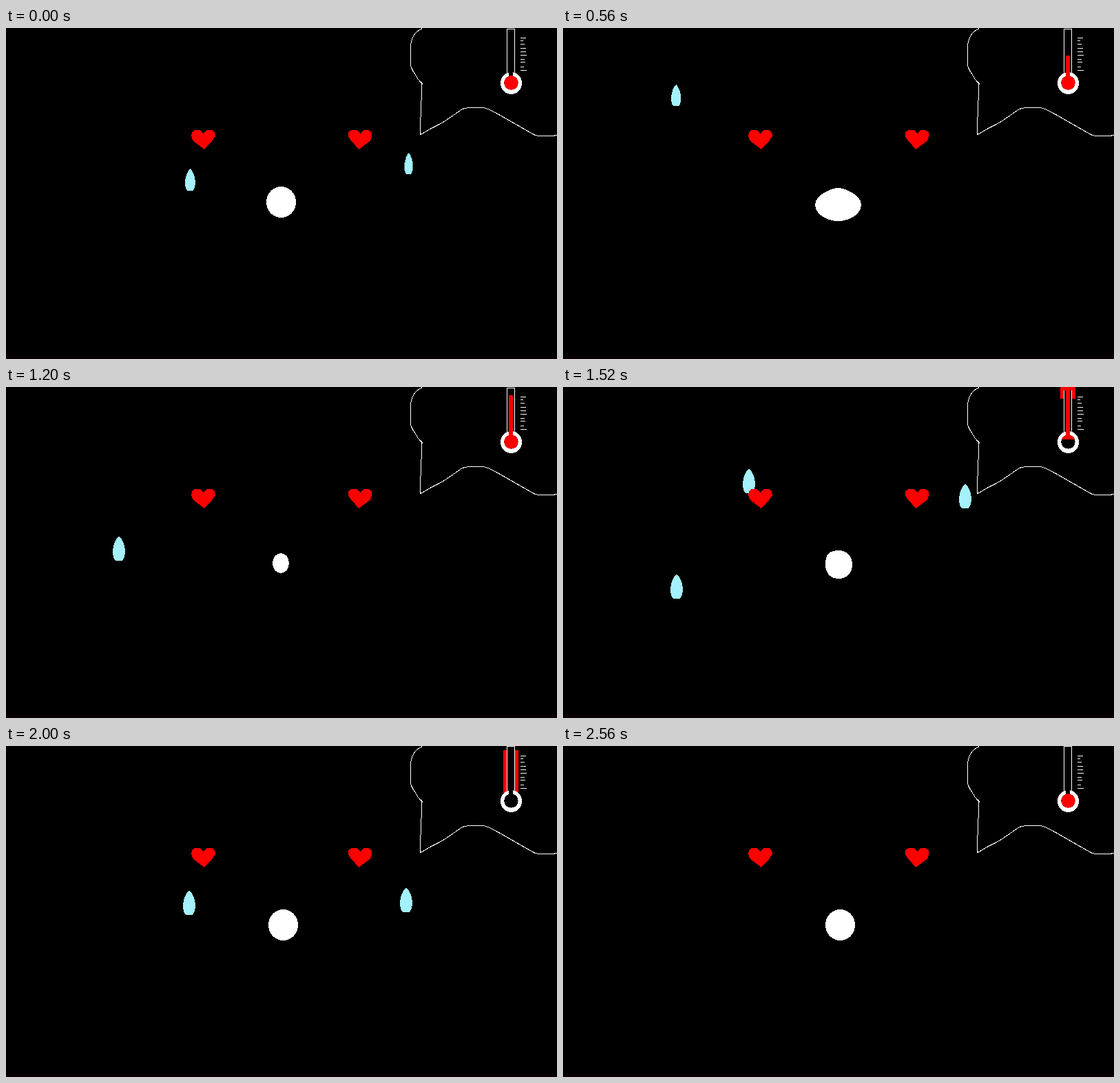
Recreate the animation shown at these times as an HTML page without scripts. Size 800x480 px, loop 2.64 s.

```html
<!DOCTYPE html>
<html lang="en">
<head>
<meta charset="utf-8">
<title>Warm face</title>
<style>
  html, body { margin: 0; width: 100%; height: 100%; overflow: hidden; background: #000; }
  svg { display: block; width: 800px; height: 480px; }

  /* One tick is 80 ms, 3.03% of the loop; steps() counts ticks. */
  .mouth, .drop, .column, .bulb, .side, .cap, .tube { animation: 2640ms step-end infinite; }
  .red { fill: #f00; }
  .line { fill: none; stroke: #fff; }
  .drop { fill: #a4f1fc; }

  .mouth { fill: #fff; animation-name: mouth; }
  @keyframes mouth {
    0% { d: path("M399.5 230C411.5 230 421 240 421 252.5S411.5 275 399.5 275 378 265 378 252.5 387.5 230 399.5 230Z"); animation-timing-function: steps(4); }
    12.12% { d: path("M400 230C407 230 430 241 430 255S414 278 400 278 370 268 370 255 393 230 400 230Z"); animation-timing-function: steps(3); }
    21.21% { d: path("M399.5 232C409 232 433 242 433 256S416 280 399.5 280 366 270 366 256 390 232 399.5 232Z"); animation-timing-function: steps(4); }
    33.33% { d: path("M398.5 234C412 234 423 244 423 256S412 278 398.5 278 374 268 374 256 385 234 398.5 234Z"); animation-timing-function: steps(4); }
    45.45% { d: path("M399 241C405.6 241 411 247.5 411 255.5S405.6 270 399 270 387 263.5 387 255.5 392.4 241 399 241Z"); animation-timing-function: steps(4); }
    57.57% { d: path("M401 237C412 237 420 246 420 257.5S412 278 401 278 381 272 381 257 387 237 401 237Z"); animation-timing-function: steps(6); }
    75.75%, 100% { d: path("M402.5 237C414.5 237 424 247 424 259.5S414.5 282 402.5 282 381 272 381 259.5 390.5 237 402.5 237Z"); }
  }

  /* Drops wait off stage between falls. */
  .left { animation-name: left; }
  @keyframes left {
    0% { transform: translate(260px, 204px) scale(.83, .89); animation-timing-function: steps(4); }
    12.12% { transform: translate(259px, 261px) scale(1); }
    15.15% { transform: translate(-99px, 0) scale(1); }
    51.51% { transform: translate(264px, 92px) scale(.7, .8); animation-timing-function: steps(2); }
    57.57% { transform: translate(261px, 118px) scale(1); animation-timing-function: steps(6); }
    75.75% { transform: translate(257px, 209px) scale(1); animation-timing-function: steps(3); }
    84.84% { transform: translate(257px, 246px) scale(1); }
    87.87% { transform: translate(255px, 250px) scale(1); }
    90.9%, 100% { transform: translate(-99px, 0) scale(1); }
  }
  .right { animation-name: right; }
  @keyframes right {
    0% { transform: translate(578.5px, 181px) scale(.69, .87); animation-timing-function: steps(4); }
    12.12% { transform: translate(577px, 201px) scale(1); }
    15.15% { transform: translate(577px, 207px) scale(1); }
    18.18% { transform: translate(-99px, 0) scale(1); }
    51.51% { transform: translate(578px, 120px) scale(.7, .8); animation-timing-function: steps(2); }
    57.57% { transform: translate(575px, 140px) scale(1); animation-timing-function: steps(6); }
    75.75% { transform: translate(572px, 205px) scale(1); animation-timing-function: steps(4); }
    87.87% { transform: translate(570px, 248px) scale(1); }
    90.9%, 100% { transform: translate(-99px, 0) scale(1); }
  }
  .far { animation-name: far; }
  @keyframes far {
    0% { transform: translate(-99px, 0) scale(1); }
    21.21% { transform: translate(157px, 82px) scale(.8, .87); animation-timing-function: steps(4); }
    33.33% { transform: translate(156px, 148px) scale(1); animation-timing-function: steps(4); }
    45.45% { transform: translate(155px, 216px) scale(1); animation-timing-function: steps(2); }
    51.51% { transform: translate(153px, 244px) scale(1); animation-timing-function: steps(2); }
    57.57% { transform: translate(156px, 271px) scale(1); }
    60.6%, 100% { transform: translate(-99px, 0) scale(1); }
  }

  /* Thermometer: rises, spills over the top, refills the bulb. */
  .column { animation-name: column; }
  @keyframes column {
    0% { y: 69px; height: 3px; animation-timing-function: steps(4); }
    12.12% { y: 51px; height: 21px; animation-timing-function: steps(10); }
    42.42% { y: 15.5px; height: 56.5px; animation-timing-function: steps(4); }
    54.54% { y: 0px; height: 72px; animation-timing-function: steps(2); }
    60.6% { y: 0px; height: 69px; animation-timing-function: steps(4); }
    72.72%, 100% { y: 0px; height: 0px; }
  }
  .bulb { animation-name: bulb; }
  @keyframes bulb {
    0% { y: 69px; height: 21px; }
    51.51% { y: 69px; height: 21px; animation-timing-function: steps(3); }
    60.6% { y: 69px; height: 0px; }
    75.75% { y: 90px; height: 0px; animation-timing-function: steps(6); }
    93.93%, 100% { y: 69px; height: 21px; }
  }
  .side { animation-name: side; }
  @keyframes side {
    0% { y: 0px; height: 0px; }
    51.51% { y: 0px; height: 0px; animation-timing-function: steps(7); }
    72.72% { y: 0px; height: 60px; }
    75.75% { y: 6px; height: 62px; animation-timing-function: steps(3); }
    84.84% { y: 20px; height: 48px; animation-timing-function: steps(4); }
    96.96%, 100% { y: 68px; height: 0px; }
  }
  .cap { animation-name: cap; }
  @keyframes cap {
    0% { height: 0px; }
    54.54% { height: 5px; }
    72.72%, 100% { height: 0px; }
  }
  .tube { animation-name: tube; }
  @keyframes tube {
    0% { transform: translateY(1px); }
    51.51%, 100% { transform: translateY(0); }
  }
</style>
</head>
<body>
<svg viewBox="0 0 800 480" shape-rendering="crispEdges">
  <defs>
    <path id="drop" d="M9 0C13 2 18 14 18 22 18 28 16 33 14 36H4C1 33 0 29 0 22 0 14 5 2 9 0Z"/>
    <path id="heart" d="M269 157 270 151 274 148H281L286 153 291 148H299L303 151 304 157 299 164 288 176 272 164Z"/>
    <clipPath id="bulb"><circle cx="733.5" cy="79.5" r="10.2"/></clipPath>
  </defs>

  <rect width="800" height="480"/>
  <rect y="476" width="800" height="4" fill="#080003"/>

  <path class="line" transform="translate(.5 .5)" d="M604 0C593 5 587 14 587 28V53C588 61 594 66 598 74L604 81 603 78V104L602 105 601 154C606 152 610 149 615 146 625 141 632 138 639 133L662 117Q668 115 675 115H692C700 116 705 120 715 125L764 153Q767 155 772 156H792L800 155"/>

  <use href="#drop" class="drop left"/>
  <use href="#drop" class="drop right"/>
  <use href="#drop" class="drop far"/>
  <use href="#heart" class="red"/>
  <use href="#heart" class="red" transform="translate(800.5) scale(-1 1)"/>
  <path class="mouth"/>

  <rect class="red side" x="722" width="5"/>
  <rect class="red side" x="739" width="5"/>
  <ellipse cx="733.5" cy="80" rx="15.5" ry="16" fill="#fff"/>
  <circle cx="733.5" cy="79.5" r="10.2"/>
  <rect x="730" y="60" width="6" height="12"/>
  <g clip-path="url(#bulb)"><rect class="red bulb" x="723" width="22"/></g>
  <path class="line tube" d="M727.5 67V.5h11V67"/>
  <rect class="red column" x="730" width="6"/>
  <rect class="red cap" x="722" y="0" width="22"/>
  <path class="line" d="M747 14.5h8M747 18.5h4M747 23.5h6M747 29.5h8M747 34.5h8M747 39.5h9M747 45.5h6M747 49.5h7M747 56.5h5M747 61.5h9"/>
</svg>
</body>
</html>
```
